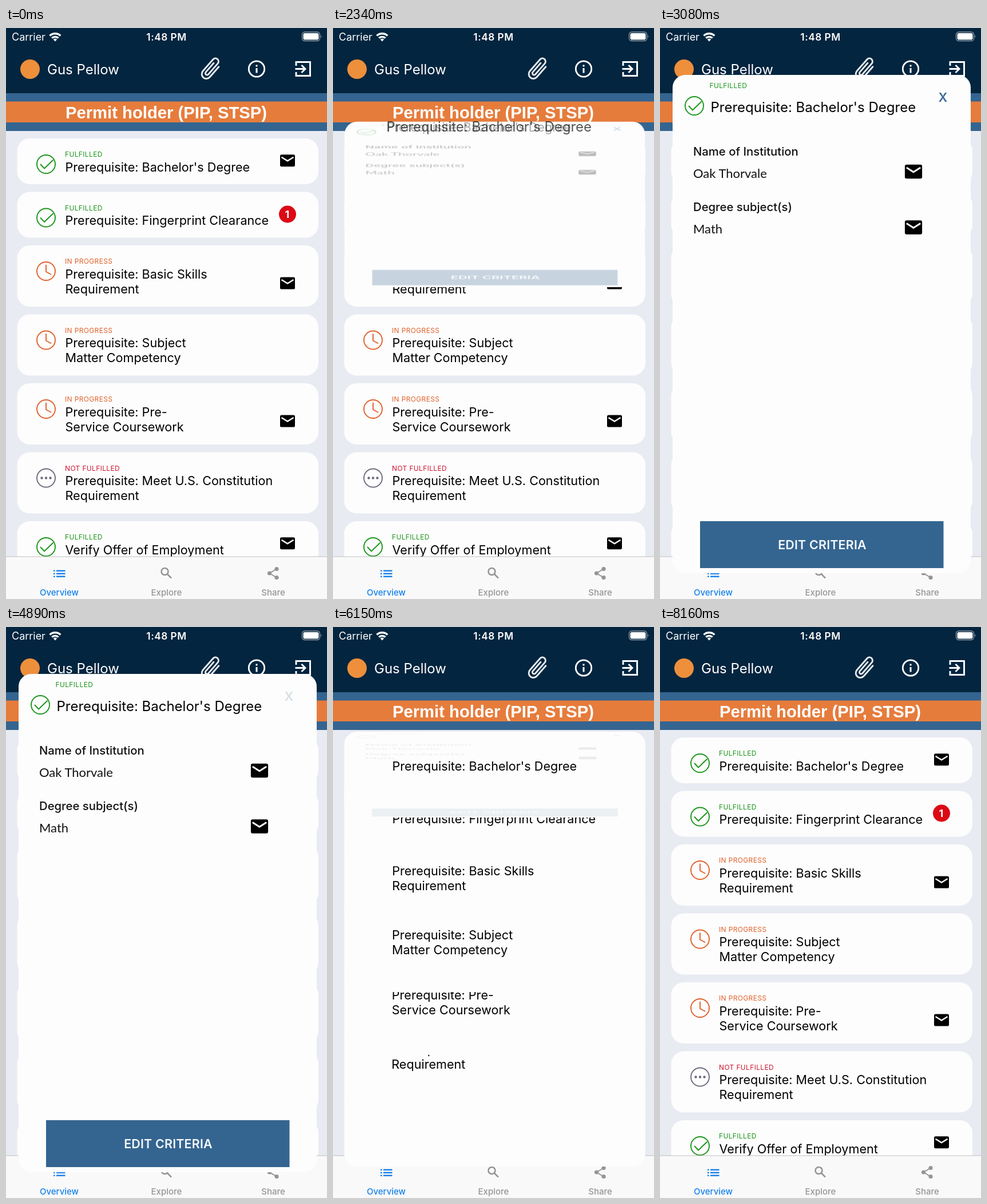
These frames come from a looping animation (561 by 998 pixels, 8810 ms). An HTML page:

```html
<!DOCTYPE html>
<html lang="en">
<head>
<meta charset="utf-8">
<title>Permit checklist</title>
<style>
  html, body { margin: 0; width: 100%; height: 100%; overflow: hidden; background: #e9ebf3; }
  svg { display: block; width: 100%; height: 100%; font-family: Inter, Roboto, sans-serif; }
  .line { fill: none; stroke-linecap: round; stroke-linejoin: round; }
</style>
</head>
<body>
<svg id="stage" viewBox="0 0 561 998"></svg>
<script>
const LOOP = 8810;
const OPEN = { at: 2050, dur: 800 };
const CLOSE = { at: 5440, dur: 900 };
const TITLE = { open: 2058, close: 5485, dur: 665, stagger: 38 };
const CLOSED = 6380;
const REVEAL = { at: 6400, stagger: 90, dur: 500 };

const PANEL = { x: 22, y: 82, w: 521, h: 871 };
const PANEL_TITLE = { x: 88.5, y: 146.5 };

const STATUS = {
  done: { label: 'FULFILLED', color: '#1b951b', mark: '<path d="M-9.5 .5l6.5 7L12-7"/>' },
  busy: { label: 'IN PROGRESS', color: '#e0612b', mark: '<path d="M0-10.500V1L8.500 5.500"/>' },
  open: { label: 'NOT FULFILLED', color: '#cf1531', ring: '#6d6a7c',
          mark: '<path stroke-width="4.400" d="M-7.500 0h.01M0 0h.01M7.500 0h.01"/>' }
};

const items = [
  { status: 'done', lines: ["Prerequisite: Bachelor's Degree"], extra: 'mail' },
  { status: 'done', lines: ['Prerequisite: Fingerprint Clearance'], extra: 'badge' },
  { status: 'busy', lines: ['Prerequisite: Basic Skills', 'Requirement'], extra: 'mail' },
  { status: 'busy', lines: ['Prerequisite: Subject', 'Matter Competency'] },
  { status: 'busy', lines: ['Prerequisite: Pre-', 'Service Coursework'], extra: 'mail' },
  { status: 'open', lines: ['Prerequisite: Meet U.S. Constitution', 'Requirement'] },
  { status: 'done', lines: ['Verify Offer of Employment'], extra: 'mail' }
];

let top_ = 193;
for (const item of items) {
  item.rect = { x: 19.5, y: top_, w: 526.5, h: item.lines.length > 1 ? 107 : 80 };
  item.title = { x: 103.5, y: top_ + 57.5 };
  top_ += item.rect.h + 13.5;
}

// Markup helpers
const text = (x, y, size, fill, str, more = '') =>
  `<text x="${x}" y="${y}" font-size="${size}" fill="${fill}" ${more}>${str}</text>`;

const box = (x, y, w, h, fill, r = 0) =>
  `<rect x="${x}" y="${y}" width="${w}" height="${h}" rx="${r}" fill="${fill}"/>`;

const line = (d, color, width) =>
  `<path class="line" d="${d}" stroke="${color}" stroke-width="${width}"/>`;

const mail = (x, y, scale = 1) =>
  `<g transform="translate(${x} ${y}) scale(${scale})">${box(-13, -10.5, 26, 21, '#000', 2.6)}
   <path d="M-10.500-6L0 .6 10.500-6" fill="none" stroke="#fdfdfd" stroke-width="2.500"/></g>`;

const statusIcon = (x, y, { color, ring = color, mark }) =>
  `<g class="line" transform="translate(${x} ${y})" stroke="${ring}" stroke-width="1.900">
   <circle r="16"/>${mark}</g>`;

const statusLabel = (x, y, { color, label }) =>
  text(x, y, 12, color, label, 'letter-spacing=".35"');

const titleLines = (lines, size) =>
  lines.map((str, i) => text(0, i * 26, size, '#000', str)).join('');

function header() {
  const white = '#fff';
  return box(0, 0, 561, 114, '#03253f')
    + text(10, 22, 18, white, 'Carrier')
    + text(280.5, 21.5, 17.3, white, '1:48 PM', 'font-weight="600" letter-spacing=".5" text-anchor="middle"')
    + `<g fill="none" stroke="#fff" stroke-width="3.400"><path d="M76.500 13.500a13.500 13.500 0 0 1 18.800 0"/>
       <path d="M80.200 17.600a8.300 8.300 0 0 1 11.400 0"/></g><path d="M82.700 20a4.800 4.800 0 0 1 6.400 0l-3.200 3.500z" fill="#fff"/>`
    + `<rect x="517.500" y="7" width="31" height="15.500" rx="4.500" fill="none" stroke="#8b9aa6" stroke-width="1.300"/>`
    + box(519.5, 9, 27, 11.5, white, 2.8)
    + `<path d="M550.300 12.300q2.400 2.400 0 5z" fill="#8b9aa6"/>`
    + `<circle cx="42" cy="72" r="17" fill="#ee8f3c"/>`
    + text(72, 80.5, 24, white, 'Gus Pellow')
    + `<g transform="translate(358 71.500) rotate(41)">`
    + line('M8-12V12A8 8 0 0 1-8 12V-15A5.500 5.500 0 0 1 3-15V10A3 3 0 0 1-3 10V-11', '#e6eaee', 2.9) + '</g>'
    + `<circle cx="438" cy="71.500" r="13.700" fill="none" stroke="#fff" stroke-width="2.800"/>`
    + box(436.5, 70, 3, 8.5, white) + box(436.5, 64.5, 3, 3, white)
    + `<path d="M507 66V59.500H531.500V83.500H507V77M505.500 71.500H523M516.500 65l6.500 6.500-6.500 6.500" fill="none" stroke="#fff" stroke-width="2.900"/>`
    + box(0, 114, 561, 66, '#346590') + box(0, 128.5, 561, 36.5, '#e67c3c')
    + text(280, 158, 29.25, white, 'Permit holder (PIP, STSP)',
        'font-weight="700" text-anchor="middle" font-family="Liberation Sans, Arial, sans-serif"');
}

function tabBar() {
  const blue = '#1580ea', gray = '#959595';
  const label = (x, color, str) =>
    text(x, 992, 15, color, str, 'font-weight="500" text-anchor="middle"');
  const rows = [947.5, 952.5, 957.5].map(y =>
    box(83, y, 2.6, 2.4, blue) + box(88, y, 15.5, 2.4, blue)).join('');
  return box(0, 924, 561, 74, '#f9f9f9') + box(0, 923.5, 561, 1, '#bfbfc1') + rows
    + `<g fill="none" stroke="${gray}" stroke-width="2.500"><circle cx="277.500" cy="950" r="6"/><path d="M282 954.500l7 7"/>
       <path stroke-width="2" d="M473 945.500L460.500 953 473 960.500"/></g>
       <g fill="${gray}"><circle cx="473" cy="945.500" r="3.600"/><circle cx="460.500" cy="953" r="3.600"/><circle cx="473" cy="960.500" r="3.600"/></g>`
    + label(93, blue, 'Overview') + label(280.5, gray, 'Explore') + label(467, gray, 'Share');
}

function card({ status, lines, extra, rect: { y } }) {
  const kind = STATUS[status];
  const extras = {
    mail: mail(492, y + (lines.length > 1 ? 66 : 38.7)),
    badge: `<circle cx="492" cy="${y + 39}" r="15" fill="#dc0a14"/>`
      + text(491.5, y + 45.5, 18, '#fff', '1', 'font-weight="700" text-anchor="middle"')
  };
  return `<g><rect rx="22" fill="#fdfdfd"/><g>${titleLines(lines, 21.6)}</g>
    <g>${statusIcon(70, y + 45, kind)}${statusLabel(103, y + 32.3, kind)}${extras[extra] || ''}</g></g>`;
}

function panel() {
  const head = 'font-weight="500"', body = 'font-family="Lato, sans-serif"';
  return `<rect id="sheet" rx="22" fill="#fdfdfd"/><g id="content">`
    + statusLabel(86.5, 105.3, STATUS.done) + statusIcon(60, 136, STATUS.done)
    + text(494.5, 129, 22, '#3f6c98', 'X', 'id="cross" font-weight="600" text-anchor="middle"')
    + text(58, 222.5, 20.3, '#111', 'Name of Institution', head)
    + text(58, 262, 22, '#111', 'Oak Thorvale', body) + mail(443, 251, 1.16)
    + text(58, 319.5, 20.3, '#111', 'Degree subject(s)', head)
    + text(58, 359, 22, '#111', 'Math', body) + mail(443, 348.5, 1.16)
    + box(70, 862, 425.5, 82, '#346590')
    + text(283.5, 911.3, 21.4, '#f6f8fa', 'EDIT CRITERIA', 'font-weight="600" letter-spacing=".2" text-anchor="middle"')
    + `</g><g id="small">${titleLines(items[0].lines, 21.6)}</g>`
    + `<g id="large">${titleLines(items[0].lines, 24)}</g>`;
}

const $ = id => document.getElementById(id);
const stage = $('stage');
stage.innerHTML = box(0, 0, 561, 998, '#e9ebf3') + header()
  + `<g id="list">${items.slice().reverse().map(card).join('')}</g>`
  + `<g id="tabs">${tabBar()}</g><g id="panel">${panel()}</g>`;

const list = $('list'), tabs = $('tabs'), overlay = $('panel');
[...list.children].reverse().forEach((node, i) => {
  [items[i].back, items[i].heading, items[i].details] = node.children;
});

// Motion helpers
const clamp = v => Math.max(0, Math.min(1, v));
const span = (t, at, dur) => clamp((t - at) / dur);
const mix = (a, b, k) => a + (b - a) * k;
const easeOut = u => 1 - (1 - u) ** 2;
const easeInOut = u => u < .5 ? 2 * u * u : 1 - 2 * (1 - u) ** 2;
const mixAll = (a, b, k) => Object.fromEntries(Object.keys(a).map(key => [key, mix(a[key], b[key], k)]));

function setRect(node, { x, y, w, h }) {
  node.setAttribute('x', x);
  node.setAttribute('y', y);
  node.setAttribute('width', w);
  node.setAttribute('height', h);
}
const place = (node, { x, y }) => node.setAttribute('transform', `translate(${x} ${y})`);
const fade = (node, v) => node.setAttribute('opacity', v);

function drawList(t, grown) {
  const closing = t >= CLOSE.at && t < CLOSED;
  const next = closing ? overlay : tabs;
  if (list.nextSibling !== next) stage.insertBefore(list, next);
  items.forEach((item, i) => {
    const moved = closing
      ? easeOut(span(t, TITLE.close + i * TITLE.stagger, TITLE.dur)) : 1;
    setRect(item.back, mixAll(item.rect, PANEL, closing ? grown : 0));
    place(item.heading, mixAll(PANEL_TITLE, item.title, moved));
    fade(item.details, t < CLOSE.at ? 1 : span(t, REVEAL.at + i * REVEAL.stagger, REVEAL.dur));
  });
}

function drawPanel(t, grown) {
  const shown = t >= OPEN.at && t < CLOSE.at + CLOSE.dur;
  overlay.setAttribute('display', shown ? 'inline' : 'none');
  if (!shown) return;
  const r = mixAll(items[0].rect, PANEL, grown);
  setRect($('sheet'), r);
  $('content').setAttribute('transform',
    `translate(${r.x} ${r.y}) scale(${r.w / PANEL.w} ${r.h / PANEL.h}) translate(${-PANEL.x} ${-PANEL.y})`);
  fade($('content'), grown);

  const k = easeOut(span(t, TITLE.open, TITLE.dur)) - easeOut(span(t, TITLE.close, TITLE.dur));
  const pos = mixAll(items[0].title, PANEL_TITLE, k);
  place($('small'), pos);
  place($('large'), pos);
  fade($('small'), 1 - k);
  fade($('large'), k);

  const pressed = t >= 4885 ? 1 - span(t, 5000, 250) : 0;
  fade($('cross'), 1 - .8 * pressed);
}

function draw(t) {
  const grown = easeInOut(span(t, OPEN.at, OPEN.dur)) - easeInOut(span(t, CLOSE.at, CLOSE.dur));
  drawList(t, grown);
  drawPanel(t, grown);
}

const start = performance.now();
function tick() {
  draw((performance.now() - start) % LOOP);
  requestAnimationFrame(tick);
}
tick();
</script>
</body>
</html>
```
